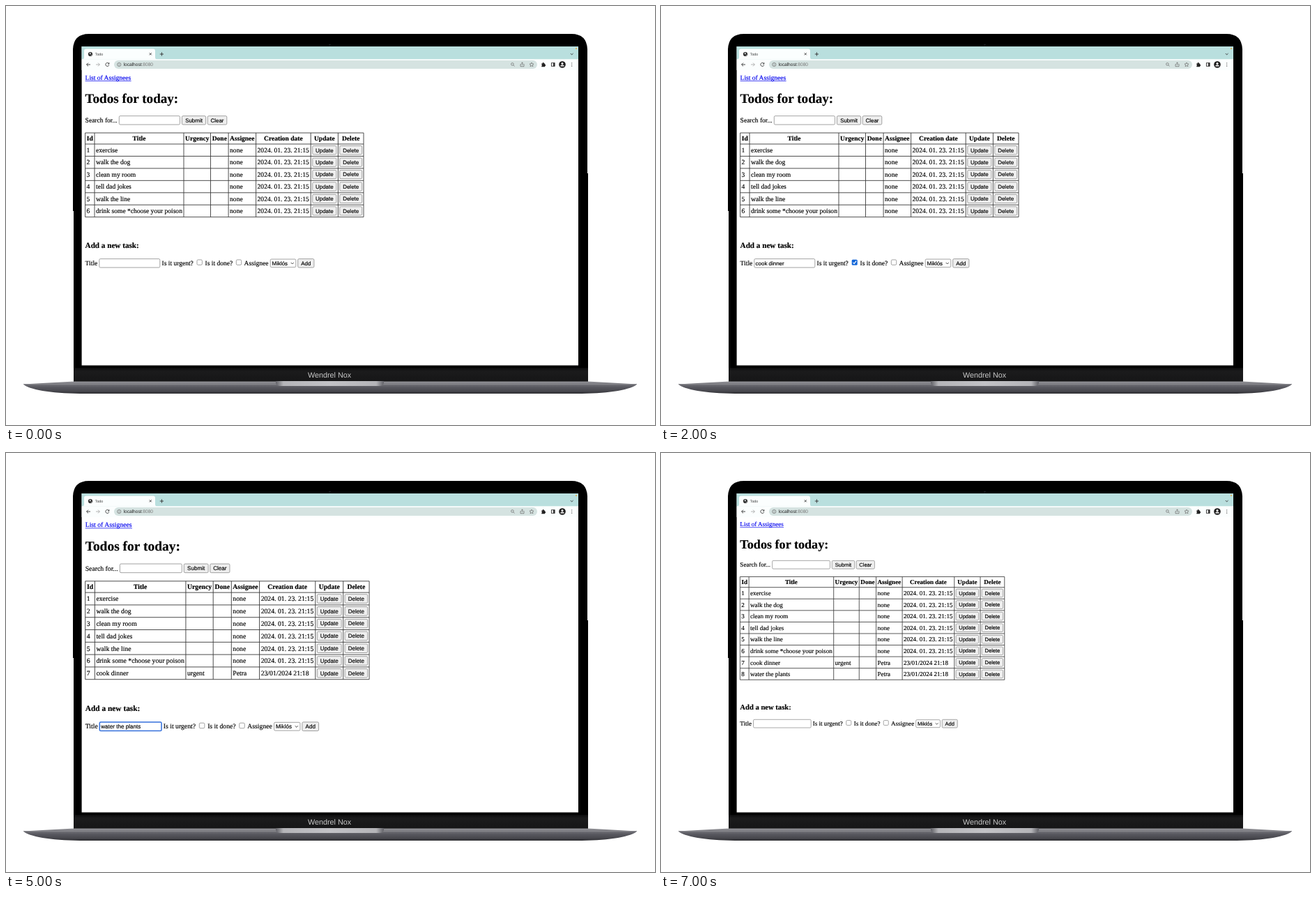
An HTML page for the animation above (8000 ms loop, 931 by 601 pixels).

```html
<!DOCTYPE html>
<html lang="en">
<head>
<meta charset="utf-8">
<title>Todo</title>
<style>
html, body { margin: 0; width: 100%; height: 100%; overflow: hidden; background: #fff; }
svg { display: block; width: 931px; height: 601px; }
text { white-space: pre; text-rendering: geometricPrecision; }
.serif { font-family: "Liberation Serif", "Times New Roman", serif; }
.sans { font-family: "Liberation Sans", Arial, sans-serif; }
#page text { fill: #000; stroke: #000; stroke-width: .16px; }
#page .link { fill: #0000ee; stroke: #0000ee; }
</style>
</head>
<body>
<svg viewBox="0 0 931 601" xmlns="http://www.w3.org/2000/svg">
  <defs>
    <linearGradient id="base" x2="0" y2="1">
      <stop offset="0" stop-color="#99999e"/>
      <stop offset=".2" stop-color="#77777d"/>
      <stop offset=".45" stop-color="#5a5a61"/>
      <stop offset=".8" stop-color="#47474d"/>
      <stop offset="1" stop-color="#2c2c30"/>
    </linearGradient>
    <linearGradient id="notch">
      <stop offset="0" stop-color="#606066"/>
      <stop offset=".07" stop-color="#b4b4b8"/>
      <stop offset=".5" stop-color="#c2c2c6"/>
      <stop offset=".93" stop-color="#b4b4b8"/>
      <stop offset="1" stop-color="#606066"/>
    </linearGradient>
    <linearGradient id="chin" x2="0" y2="1">
      <stop offset="0" stop-color="#0c0c0d"/>
      <stop offset=".25" stop-color="#1b1b1c"/>
      <stop offset="1" stop-color="#161617"/>
    </linearGradient>
    <clipPath id="screen"><rect x="108.6" y="58" width="712.4" height="457.6"/></clipPath>
  </defs>

  <!-- laptop -->
  <path d="M97 539V294H96V62Q97 40 119 40H811Q833 40 834 62V240H835V539Z" fill="#000"/>
  <circle cx="464.5" cy="56" r="1.6" fill="#17191d"/>
  <rect x="97" y="519" width="738" height="19" fill="url(#chin)"/>
  <text class="sans" x="464" y="533.2" font-size="10.8" text-anchor="middle" fill="#c9c9c9">Wendrel Nox</text>
  <path d="M25 542.5L97 538.5H835L905 542.5C898 550 866 555.5 826 556H106C64 555.5 32 550 25 542.5Z" fill="url(#base)"/>
  <path d="M25 542.5H905" stroke="#88888d" stroke-width="1"/>
  <path d="M387 538H542V541Q541 545 535 545H394Q388 545 387 541Z" fill="url(#notch)"/>

  <!-- browser -->
  <g clip-path="url(#screen)">
    <rect x="108" y="58" width="714" height="458" fill="#fff"/>
    <rect x="108" y="58" width="714" height="18.5" fill="#b9dfde"/>
    <path d="M109 76.5Q112 76.5 112 73.5V64.5Q112 61.5 115 61.5H211Q214 61.5 214 64.5V73.5Q214 76.5 217 76.5Z" fill="#fbfefe"/>
    <rect x="108" y="76.5" width="714" height="15.5" fill="#fbfefe"/>
    <rect x="155" y="78" width="607" height="12" rx="6" fill="#d5e3e1"/>
    <g class="sans">
      <text x="127.8" y="70.6" font-size="5.2" fill="#333">Todo</text>
      <text x="168.5" y="86.4" font-size="6.6" fill="#222">localhost<tspan fill="#777">:8080</tspan></text>
    </g>
    <circle cx="121" cy="69" r="3.1" fill="#333"/>
    <path d="M119.5 68l1.5-1.3 1 1.6-1.4 1zM121.5 70.4l1.5-.6-.7 1.6z" fill="#e8efef"/>
    <g fill="none" stroke="#333" stroke-width=".9">
      <path d="M205.8 67.3l3 3m0-3l-3 3M220.8 69h5.2m-2.6-2.6v5.2M809.8 68l1.9 1.9 1.9-1.9"/>
      <path d="M121 84h-5.4m2.4-2.4L115.6 84l2.4 2.4"/>
      <path d="M129 84h5.4m-2.4-2.4l2.4 2.4-2.4 2.4" stroke="#aaa"/>
      <path d="M147.4 82.4A2.5 2.5 0 1 0 147.8 84.7M147.9 81.2v1.9h-1.9"/>
      <g stroke="#666" stroke-width=".7">
        <circle cx="162.3" cy="84" r="2.6"/><path d="M162.3 83.7v1.8m0-3.1v.7"/>
        <circle cx="726.4" cy="83.4" r="1.8"/><path d="M727.7 84.7l1.8 1.8"/>
        <path d="M739 83.5h-1v3.2h5v-3.2h-1M740.5 85v-4m-1.3 1.2l1.3-1.3 1.3 1.3"/>
        <path d="M754 81l.9 1.9 2.1.3-1.5 1.4.4 2.1-1.9-1-1.9 1 .4-2.1-1.5-1.4 2.1-.3z"/>
      </g>
      <rect x="782.4" y="81.7" width="4.6" height="4.6"/>
    </g>
    <path d="M768.3 82.6h1.4a1.1 1.1 0 1 1 2 0h1.5v1.5a1 1 0 1 1 0 2v1.2h-4.9v-1.5a1 1 0 0 0 0-1.8z" fill="#222"/>
    <rect x="785" y="81.5" width="2.3" height="5" fill="#333"/>
    <circle cx="798" cy="84" r="4.8" fill="#1b1b1b"/>
    <circle cx="798" cy="82.5" r="1.5" fill="#fff"/>
    <path d="M795.2 86.6a2.8 2.1 0 0 1 5.6 0z" fill="#fff"/>
    <g fill="#444"><circle cx="811.7" cy="81.8" r=".6"/><circle cx="811.7" cy="84" r=".6"/><circle cx="811.7" cy="86.2" r=".6"/></g>
    <circle cx="818" cy="61" r="1.1" fill="#e8b04a"/>
    <g id="page"></g>
  </g>
</svg>
<script>
const page = document.getElementById('page');
const OX = 108.9, OY = 91.5;          // page corner, zoom centre
const ROW = 17.45, TOP = 182, BODY = 198;
const COLS = [113.6, 127, 255, 293.5, 319.1, 358.6, 437.2, 476.4, 513];
const HEADS = ['Id', 'Title', 'Urgency', 'Done', 'Assignee', 'Creation date', 'Update', 'Delete'];
const FIRST = 'Miklós', SECOND = 'Petra';
const OLD = '2024. 01. 23. 21:15', NEW = '23/01/2024 21:18';
const TASKS = [
  ...['exercise', 'walk the dog', 'clean my room', 'tell dad jokes', 'walk the line',
      'drink some *choose your poison'].map(t => [t, '', '', 'none', OLD]),
  ['cook dinner', 'urgent', '', SECOND, NEW],
  ['water the plants', '', '', SECOND, NEW]
];

// one state per second
const blank = { rows: 6, zoom: 1, title: '', who: FIRST };
const dinner = { ...blank, title: 'cook dinner' };
const seven = { ...blank, rows: 7, zoom: 1.02 };
const plants = { ...seven, title: 'water the plants' };
const STATES = [
  blank,
  { ...dinner, focus: 'title' },
  { ...dinner, urgent: true },
  { ...dinner, urgent: true, who: SECOND, focus: 'who' },
  seven,
  { ...plants, focus: 'title' },
  { ...plants, who: SECOND, focus: 'who', hover: true },
  { ...blank, rows: 8, zoom: 0.95 }
];

const text = (x, y, s, { size = 9.54, bold, mid, cls = 'serif' } = {}) =>
  `<text class="${cls}" x="${x}" y="${y}" font-size="${size}"` +
  `${bold ? ' font-weight="700"' : ''}${mid ? ' text-anchor="middle"' : ''}>${s}</text>`;
const label = (x, y, s, mid) => text(x, y, s, { size: 7.95, cls: 'sans', mid });
const box = (x, y, w, h, fill, focus) =>
  `<rect x="${x}" y="${y}" width="${w}" height="${h}" rx="1.6" fill="${fill}" ` +
  `stroke="${focus ? '#3570dc' : '#7d7d7d'}" stroke-width="${focus ? 1.5 : 0.7}"/>`;
const button = (x, y, w, s, fill = '#efefef') =>
  box(x, y, w, 12.4, fill) + label(x + w / 2, y + 9, s, true);

function check(x, y, on) {
  if (!on) return box(x, y, 7.4, 7.4, '#fff');
  return `<rect x="${x - .3}" y="${y - .3}" width="8" height="8" rx="1.5" fill="#1467d8"/>` +
    `<path d="M${x + 1.5} ${y + 3.9}l1.6 1.7 3-3.9" fill="none" stroke="#fff" stroke-width="1.2"/>`;
}

function table(n) {
  const end = BODY + n * ROW;
  let grid = `M${COLS[0]} ${TOP}H${COLS[8]}`, out = '';
  for (let i = 0; i <= n; i++) grid += `M${COLS[0]} ${BODY + i * ROW}H${COLS[8]}`;
  for (const x of COLS) grid += `M${x} ${TOP}V${end}`;
  HEADS.forEach((h, i) => {
    out += text((COLS[i] + COLS[i + 1]) / 2, 193.3, h, { bold: true, mid: true });
  });
  TASKS.slice(0, n).forEach((task, r) => {
    const y = BODY + r * ROW;
    [r + 1, ...task].forEach((s, c) => { out += text(COLS[c] + 2, y + 12, s); });
    out += button(439.7, y + 2.5, 34.2, 'Update') + button(478.7, y + 2.5, 32, 'Delete');
  });
  return `<path d="${grid}" fill="none" stroke="#3c3c3c" stroke-width=".9"/>` + out;
}

function form(s) {
  return text(113.6, 347.2, 'Add a new task:', { size: 11.16, bold: true }) +
    text(113.6, 371.9, 'Title') +
    box(133.8, 362.7, 87, 12.4, '#fff', s.focus === 'title') + label(135.6, 371.6, s.title) +
    text(223.5, 371.9, 'Is it urgent?') + check(274, 364, s.urgent) +
    text(285.6, 371.9, 'Is it done?') + check(330.3, 364) +
    text(341.6, 371.9, 'Assignee') +
    box(379.2, 363.1, 36.6, 11.6, '#fff', s.focus === 'who') + label(381.6, 371.6, s.who) +
    '<path d="M408.7 368l2 2 2-2" fill="none" stroke="#333" stroke-width=".9"/>' +
    button(418.7, 362.7, 23.2, 'Add', s.hover ? '#e3e5e6' : '#efefef');
}

function draw(s) {
  page.setAttribute('transform',
    `translate(${OX} ${OY}) scale(${s.zoom}) translate(${-OX} ${-OY})`);
  page.innerHTML =
    text(113.6, 106.2, 'List of Assignees', { cls: 'serif link' }) +
    '<path d="M113.6 107.5H179.6" stroke="#0000ee" stroke-width=".7"/>' +
    text(113.6, 139.3, 'Todos for today:', { size: 19.08, bold: true }) +
    text(113.6, 167, 'Search for...') +
    box(162.3, 157.7, 87.2, 12.4, '#fff') +
    button(252.4, 157.7, 34.2, 'Submit') + button(289.2, 157.7, 27.6, 'Clear') +
    table(s.rows) +
    `<g transform="translate(0 ${(s.rows - 6) * ROW})">${form(s)}</g>`;
}

let shown = -1;
const start = performance.now();
function tick(now) {
  const i = Math.floor(Math.max(0, now - start) / 1000) % STATES.length;
  if (i !== shown) draw(STATES[shown = i]);
  requestAnimationFrame(tick);
}
tick(start);
</script>
</body>
</html>
```
